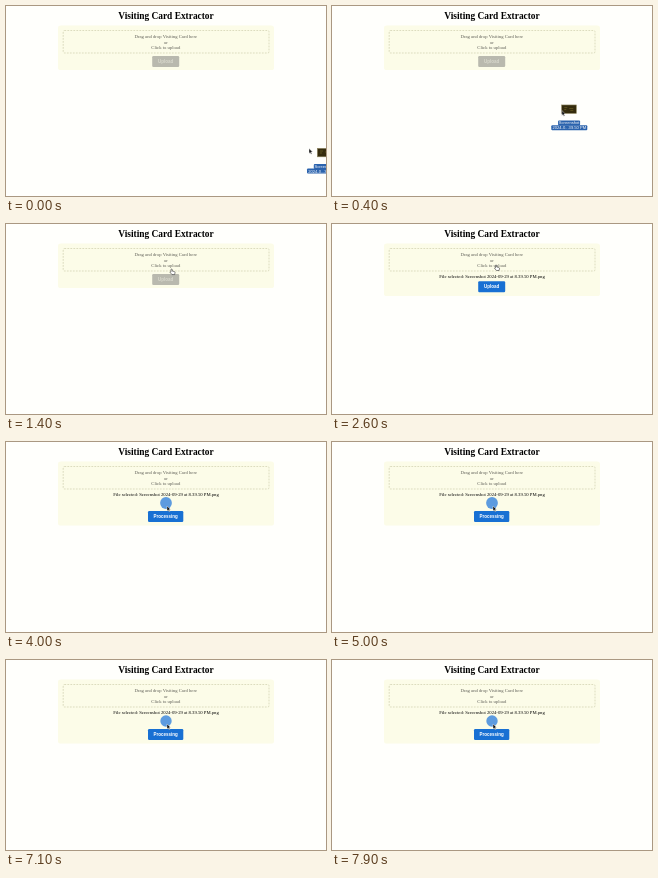
Write an HTML page that moves like this. It is 320 by 190 pixels and loops after 8000 ms.

```html
<!DOCTYPE html>
<html lang="en">
<head>
<meta charset="utf-8">
<title>Visiting Card Extractor</title>
<style>
  html, body { margin: 0; width: 100%; height: 100%; overflow: hidden; background: #fffffc; }
  svg { display: block; width: 100vw; height: 100vh; }
  text { font: 4.7px "Liberation Serif", serif; text-anchor: middle; }
  .title { font-size: 9.4px; font-weight: bold; }
  .hint { fill: #5c5c54; }
  .button { font: bold 4.5px "Liberation Sans", sans-serif; fill: #fff; }
  .label { font: 4.1px "Liberation Sans", sans-serif; fill: #fff; }
</style>
</head>
<body>
<svg viewBox="0 0 320 190">
  <rect width="320" height="190" fill="#fffffc"/>
  <text class="title" x="160" y="12.7">Visiting Card Extractor</text>
  <rect id="panel" x="52" y="19.5" width="216" rx="2.6" fill="#fcfce8"/>
  <rect x="57.2" y="24.5" width="205.8" height="22.5" rx="1.2" fill="none" stroke="#cfcfae" stroke-width=".7" stroke-dasharray="1.8 1.2"/>
  <g class="hint">
    <text x="159.8" y="32.2">Drag and drop Visiting Card here</text>
    <text x="159.8" y="37.5">or</text>
    <text x="159.8" y="42.9">Click to upload</text>
  </g>
  <text id="file" x="160" y="53.8" fill="#000">File selected: Screenshot 2024-09-29 at 8.39.50 PM.png</text>
  <circle id="spinner" cx="160" cy="61" fill="#5d9bdf"/>
  <rect id="buttonBox" height="11" rx="1.2"/>
  <text id="buttonText" class="button" x="159.7"></text>
  <g id="drag">
    <rect x=".4" y=".4" width="14.6" height="8.4" fill="#352c0d" stroke="#8a805a" stroke-width=".6"/>
    <path d="M3 3h3M3 5h2M8 4h4M9 6h3" stroke="#776829" stroke-width=".6"/>
    <rect x="-3.2" y="16" width="22" height="5" rx="1" fill="#2b63ad"/>
    <rect x="-10" y="20.6" width="36" height="5" rx="1" fill="#2b63ad"/>
    <text class="label" x="7.8" y="19.8">Screenshot</text>
    <text class="label" x="8" y="24.6">2024-0...39.50 PM</text>
  </g>
  <g id="cursor" stroke="#fff" stroke-width=".4" stroke-linejoin="round">
    <path id="arrow" d="M0 0V5L1.2 3.9L2 5.7L2.9 5.3L2.1 3.6H3.6Z" fill="#111"/>
    <path id="hand" d="M.6 0Q1.4-.2 1.4.6V2L3.6 2.5Q4.3 2.8 4.2 3.6L3.8 5.5H1.2L-.7 3.4Q-.6 2.6.1 3V.6Q.1.1.6 0Z" fill="#fff" stroke="#222" stroke-width=".55"/>
    <g id="plus">
      <circle cx="2.6" cy="5.8" r="2" fill="#35a52d" stroke="none"/>
      <path d="M1.4 5.8h2.4M2.6 4.6v2.4" stroke-width=".6"/>
    </g>
  </g>
</svg>
<script>
const $ = id => document.getElementById(id);
const LOOP = 8000, STEP = 100, PULSE = 1000;
const DROPPED = 1400, SELECTED = 1800, PROCESSING = 4000;

// Each stop is [time, x, y].
const dragPath = [[0, 311, 142], [700, 168, 66], [800, 168, 66], [900, 165.5, 55], [1400, 159, 34]];
const cursorPath = [
  [0, 303, 142.5], [700, 175, 76], [800, 175, 76], [900, 172.5, 65.5], [1500, 163.3, 41],
  [2600, 163.3, 41], [3000, 176, 113], [3400, 158, 64], [3700, 161, 64]
];

function along(path, time) {
  const next = path.findIndex(stop => stop[0] > time);
  if (next < 0) return path[path.length - 1].slice(1);
  const [t0, x0, y0] = path[next - 1], [t1, x1, y1] = path[next];
  const k = (time - t0) / (t1 - t0);
  return [x0 + (x1 - x0) * k, y0 + (y1 - y0) * k];
}

const set = (id, attrs) => Object.entries(attrs).forEach(([key, value]) => $(id).setAttribute(key, value));
const show = (id, visible) => set(id, { display: visible ? "inline" : "none" });
const place = (id, [x, y]) => set(id, { transform: `translate(${x} ${y})` });

function drawButton(label, x, y, width, fill, textFill) {
  set("buttonBox", { x, y, width, fill });
  set("buttonText", { y: y + 7.2 });
  $("buttonText").style.fill = textFill;
  $("buttonText").textContent = label;
}

function draw(time) {
  const dragging = time < DROPPED;
  const selected = time >= SELECTED;
  const processing = time >= PROCESSING;
  const [x, y] = along(cursorPath, time);
  const hand = !dragging && !processing && y <= 72;
  const shrink = 0.5 - 0.5 * Math.cos(time / PULSE * 2 * Math.PI);

  set("panel", { height: processing ? 64 : selected ? 52.5 : 44.5 });
  show("file", selected);
  show("spinner", processing);
  set("spinner", { r: 5.9 * (1 - 0.4 * shrink) });

  if (processing) drawButton("Processing", 142, 69, 35.3, "#1870d3", "#fff");
  else if (selected) drawButton("Upload", 146.2, 57.2, 27, "#1870d3", "#fff");
  else drawButton("Upload", 146.2, 50, 27, "#b9b9ae", "#d8d8cc");

  show("drag", dragging);
  place("drag", along(dragPath, time));
  place("cursor", [x, y]);
  show("hand", hand);
  show("arrow", !hand);
  show("plus", dragging && time >= 500);
}

function tick(now) {
  draw(Math.floor(now % LOOP / STEP) * STEP);
  requestAnimationFrame(tick);
}
draw(0);
requestAnimationFrame(tick);
</script>
</body>
</html>
```
